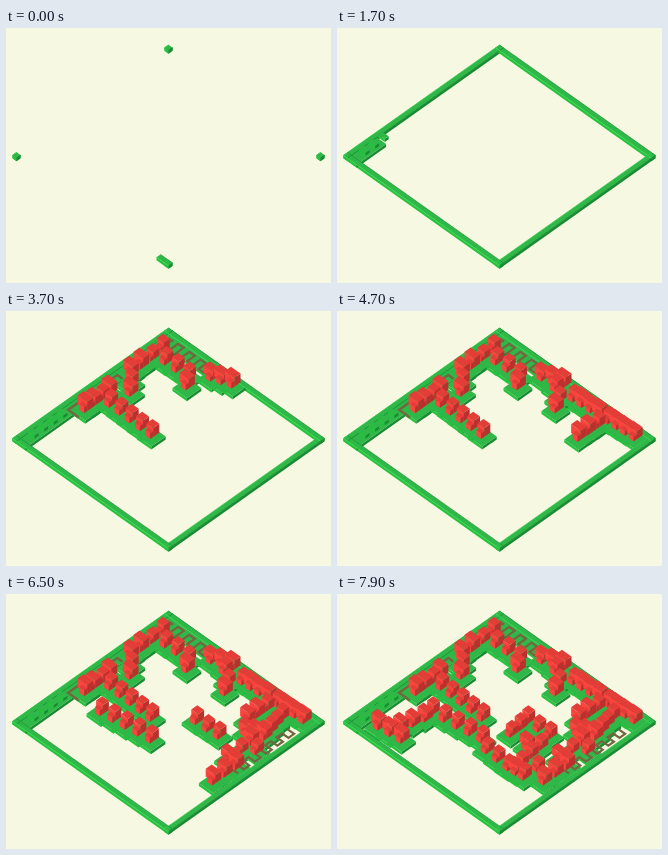
Write an HTML page with a canvas that moves like this. It is 325 px wide and 255 px high and loops after 8000 ms.

```html
<!DOCTYPE html>
<html lang="en">
<head>
<meta charset="utf-8">
<title>Growing isometric board</title>
<style>
html, body { margin: 0; width: 100%; height: 100%; overflow: hidden; background: #f7f8e2; }
canvas { display: block; width: 325px; height: 255px; }
</style>
</head>
<body>
<canvas id="stage" width="325" height="255"></canvas>
<script>
const ctx = document.getElementById('stage').getContext('2d');
const LOOP = 8000, STEP = 100, N = 39, UX = 4, UY = 2.83, PLATE = 3, TILE = 1.8;
const GREEN = { top: '#2fb748', left: '#25c33b', right: '#1a8a34' };
const RED = { top: '#e33d38', left: '#f9453e', right: '#b9302d' };
const TRAIL = '#74663f';

const clamp = v => Math.max(0, Math.min(1, v));
const mix = (a, b, k) => a + (b - a) * k;
const ramp = (t, from, to) => clamp((t - from) / (to - from));

let seed = 7;
const random = () => (seed = seed * 16807 % 2147483647) / 2147483647;

// Board coordinates: a runs down-right, b runs down-left, h is pixels up.
const at = (a, b, h = 0) => [162.5 + (a - b) * UX, 17 + (a + b) * UY - h];

function trace(points) {
  ctx.beginPath();
  points.forEach(([x, y]) => ctx.lineTo(x, y));
}
function face(color, ...points) {
  trace(points);
  ctx.closePath();
  ctx.fillStyle = color;
  ctx.fill();
}
function line(color, width, ...points) {
  trace(points);
  ctx.strokeStyle = color;
  ctx.lineWidth = width;
  ctx.stroke();
}
function sides([a0, a1, b0, b1], low, high, c) {
  face(c.left, at(a0, b1, high), at(a1, b1, high), at(a1, b1, low), at(a0, b1, low));
  face(c.right, at(a1, b0, high), at(a1, b1, high), at(a1, b1, low), at(a1, b0, low));
}
function lid([a0, a1, b0, b1], h, color) {
  face(color, at(a0, b0, h), at(a1, b0, h), at(a1, b1, h), at(a0, b1, h));
}
function box(r, h, c) {
  sides(r, 0, h, c);
  lid(r, h, c.top);
}

// Splits a polyline into evenly spaced spots, about `gap` cells apart.
function walk(points, gap) {
  const spots = [points[0]];
  for (let i = 1; i < points.length; i++) {
    const [a0, b0] = points[i - 1], [a1, b1] = points[i];
    const n = Math.max(1, Math.round(Math.hypot(a1 - a0, b1 - b0) / gap));
    for (let j = 1; j <= n; j++) spots.push([mix(a0, a1, j / n), mix(b0, b1, j / n)]);
  }
  return spots;
}

// A branch sets one house on one tile after another along its key points.
const houses = [];
function branch(start, end, gap, ...points) {
  const spots = walk(points, gap);
  spots.forEach(([a, b], i) => houses.push({
    a, b,
    long: gap < 2.5 && random() < 0.5 ? 0.7 : 0,
    h: 7 + 2 * random(),
    start: mix(start, end, (i + 1) / spots.length)
  }));
}

branch(1850, 2150, 1.9, [4.2, 25], [4.2, 19]);
branch(2150, 2500, 2.65, [6.4, 21], [17, 21.3]);
branch(2700, 3400, 2.4, [7, 16.5], [3.6, 13], [3.3, 5], [5.8, 6.6], [11.3, 6.4], [12.9, 8.3]);
branch(3400, 3700, 1.9, [14.4, 3.7], [18.3, 2.3]);
branch(3700, 4100, 2.2, [18, 4], [20.3, 5.5], [21.7, 7.6]);
branch(3900, 4700, 2.1, [22, 3.5], [36.5, 2.7]);
branch(4200, 4600, 2.3, [29.7, 5.2], [29.6, 9.8]);
branch(4700, 5400, 2.2, [33.2, 5], [34.5, 10.5], [31.6, 12.2], [36, 14.1]);
branch(5400, 5900, 2.3, [34, 16], [34, 19], [36.2, 19.3], [36, 24.8]);
branch(5700, 6100, 2.65, [28.6, 16.1], [23.2, 16.3]);
branch(5900, 6400, 2.65, [9.7, 26.6], [20.8, 25.2]);
branch(6400, 7100, 2.4, [10, 28.6], [8.8, 33.5], [10.8, 35.3], [5.6, 35.8]);
branch(6700, 7200, 2.8, [23.3, 26.5], [26.2, 26.7]);
branch(7200, 7800, 2.2, [29, 26.8], [32.6, 26.5], [32.8, 23.4], [30, 24.6], [29.4, 19.2], [27.7, 20.8]);
branch(7500, 7800, 2.1, [23.4, 20.6], [23.4, 18.4]);
houses.sort((p, q) => p.a + p.b - q.a - q.b);

// Border sides, with the cells grown from either end when they slow down.
const borders = [
  { ends: [9, 13], rect: (p, q) => [0, 1, p, q] },
  { ends: [8, 5], rect: (p, q) => [p, q, 0, 1] },
  { ends: [8, 13], rect: (p, q) => [N - 1, N, p, q] },
  { ends: [1, N - 1], rect: (p, q) => [p, q, N - 1, N] }
];
function bars(t) {
  return borders.flatMap(({ ends, rect }) => {
    const full = N / (ends[0] + ends[1]);
    const [p, q] = ends.map(n =>
      Math.floor(mix(1, n, ramp(t, -60, 900))) * mix(1, full, ramp(t, 900, 1600)));
    return p + q >= N ? [rect(0, N)] : [rect(0, p), rect(N - q, N)];
  });
}

// Strips that spread along the two upper sides.
function bands(t) {
  const left = N - 11 * ramp(t, 1500, 1800) - 14 * ramp(t, 1850, 2500) - 14 * ramp(t, 2700, 3100);
  const right = 38 * ramp(t, 2850, 4650);
  return [[0, 3.3, left, N], [0, right, 0, 3.6]].filter(r => r[1] > r[0] && r[3] > r[2]);
}

const tile = ({ a, b }) =>
  [Math.max(0, a - TILE), Math.min(N, a + TILE), Math.max(0, b - TILE), Math.min(N, b + TILE)];

// Square wave lying on the plates, along a or along b.
function meander(from, to, low, high, alongB) {
  const pts = [];
  for (let s = from, up = false; s <= to; s += 1.4, up = !up) {
    const pair = up ? [high, low] : [low, high];
    pair.forEach(v => pts.push(alongB ? at(v, s) : at(s, v)));
  }
  line(TRAIL, 2.2, ...pts);
}

function trails(t) {
  if (t >= 2100) line(TRAIL, 2.4, at(4.6, 27), at(1.9, 27), at(1.9, 22.8), at(3.2, 22.8));
  if (t >= 2400) line(TRAIL, 2.4, at(1.9, 18), at(1.9, 14.7), at(3.2, 14.7));
  if (t >= 3000) line(TRAIL, 2, at(1.9, 7), at(1.9, 1.8), at(3, 1.8));
  if (t >= 3100) meander(2.6, mix(2.6, 14, ramp(t, 3100, 3600)), 1.6, 3.5, false);
  if (t >= 4900) meander(6, mix(6, 20, ramp(t, 4900, 5900)), 35.8, 37.4, true);
}

function house({ a, b, h, long }) {
  a -= 0.5;
  b -= 0.7;
  box([a - 0.9 - long, a + 0.8, b - 1, b + 0.5], h, RED);
  box([a - 0.4, a + 0.8, b + 0.5, b + 1.3], h - 3, RED);
}

function draw(t) {
  ctx.fillStyle = '#f7f8e2';
  ctx.fillRect(0, 0, 325, 255);

  const edge = bars(t), built = houses.filter(p => t >= p.start);
  const floor = [...edge, ...bands(t), ...built.map(tile)];
  floor.forEach(r => sides(r, -PLATE, 0, GREEN));
  floor.forEach(r => lid(r, 0, GREEN.top));

  // Ridges along the border
  edge.forEach(([a0, a1, b0, b1]) => {
    if (a1 - a0 > b1 - b0) {
      line('#1f9139', 0.7, at(a0, b0), at(a1, b0));
      line('#3fdc5a', 0.9, at(a0, b1), at(a1, b1));
    } else {
      line('#36c951', 0.8, at(a0, b0), at(a0, b1));
      line('#1a8a34', 0.8, at(a1, b0), at(a1, b1));
    }
  });
  trails(t);

  // Rungs in the left corner
  for (let i = 0; i < 4; i++) {
    const b = 35.8 - i * 2.4;
    if (t >= 1550 + i * 70) box([1.2, 2.8, b - 0.5, b + 0.5], 3, GREEN);
  }
  built.forEach(house);
}

function tick(now) {
  draw(Math.floor(now % LOOP / STEP) * STEP);
  requestAnimationFrame(tick);
}
draw(0);
requestAnimationFrame(tick);
</script>
</body>
</html>
```
